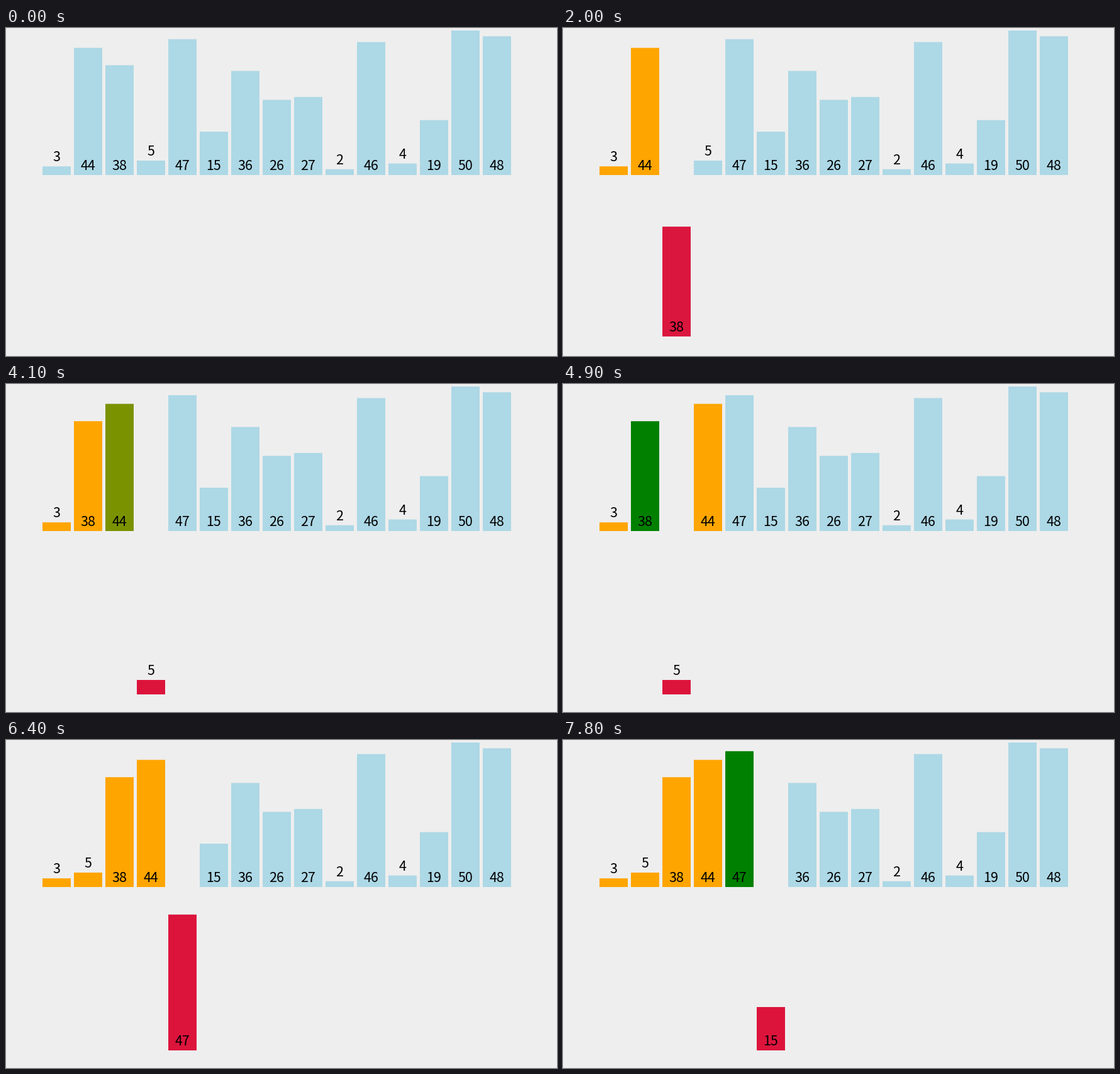
A matplotlib script for the animation above (8 s loop, 876x522 px).

```python
import matplotlib.pyplot as plt
import numpy as np
from matplotlib.animation import FuncAnimation
from matplotlib.colors import to_rgb
from matplotlib.patches import Rectangle

W, H, DPI = 876, 522, 64
FRAMES, INTERVAL = 80, 100
VALUES = [3, 44, 38, 5, 47, 15, 36, 26, 27, 2, 46, 4, 19, 50, 48]

LEFT, PITCH, BAR_W, UNIT = 58, 50, 45, 4.6
BASE, DROP = 234, 260
LABEL_GAP, LABEL_PX, SMALL = 8, 21.5, 5

FIRST, PERIOD, FADE = 395, 361, 188  # step timing in ms

IDLE, SORTED, COMPARE, PICKED = (
    np.array(to_rgb(c)) for c in ("lightblue", "orange", "green", "crimson"))


def slot_x(i):
    return LEFT + PITCH * i


def ease(u):
    """Cubic in-out."""
    u = min(max(u, 0.0), 1.0)
    return 4 * u ** 3 if u < 0.5 else 1 - 4 * (1 - u) ** 3


def sort_steps(values):
    """Insertion sort as a list of steps, each {bar: {property: goal}}."""
    order = list(range(len(values)))
    steps = [{0: dict(color=SORTED)}]
    for i in range(1, len(values)):
        key, j = order[i], i
        steps.append({key: dict(y=BASE + DROP, color=PICKED)})
        passed = None
        while j > 0:
            other = order[j - 1]
            step = {other: dict(color=COMPARE)}
            if passed is not None:
                step[passed] = dict(color=SORTED)
            steps.append(step)
            if values[other] <= values[key]:
                break
            steps.append({other: dict(x=slot_x(j)), key: dict(x=slot_x(j - 1))})
            order[j - 1], order[j] = key, other
            passed, j = other, j - 1
        last = order[j - 1] if j > 0 else passed
        steps.append({key: dict(y=BASE, color=SORTED), last: dict(color=SORTED)})
    return steps


STEPS = sort_steps(VALUES)


def state_at(t):
    bars = [dict(x=slot_x(i), y=BASE, color=IDLE) for i in range(len(VALUES))]
    for k, step in enumerate(STEPS):
        u = ease((t - FIRST - PERIOD * k) / FADE)
        if u == 0:
            break
        for i, goals in step.items():
            for name, goal in goals.items():
                bars[i][name] = bars[i][name] + (goal - bars[i][name]) * u
    return bars


fig = plt.figure(figsize=(W / DPI, H / DPI), dpi=DPI, facecolor="#eeeeee")
ax = fig.add_axes([0, 0, 1, 1])
ax.set_xlim(0, W)
ax.set_ylim(H, 0)
ax.axis("off")

rects, labels = [], []
for value in VALUES:
    rects.append(ax.add_patch(
        Rectangle((0, 0), BAR_W, UNIT * value, linewidth=0, snap=False)))
    labels.append(ax.text(
        0, 0, str(value), ha="center", va="baseline", color="black",
        family="Noto Sans CJK JP", size=LABEL_PX * 72 / DPI, zorder=3))


def draw(frame):
    for bar, value, rect, label in zip(
            state_at(frame * INTERVAL), VALUES, rects, labels):
        x, y = bar["x"], bar["y"]
        top = y - UNIT * value
        rect.set_xy((x, top))
        rect.set_facecolor(bar["color"])
        foot = top if value <= SMALL else y
        label.set_position((x + BAR_W / 2, foot - LABEL_GAP))
    return rects + labels


def reset():
    return draw(0)


anim = FuncAnimation(fig, draw, frames=FRAMES, interval=INTERVAL,
                     init_func=reset, repeat=True, repeat_delay=0)
plt.show()
```
